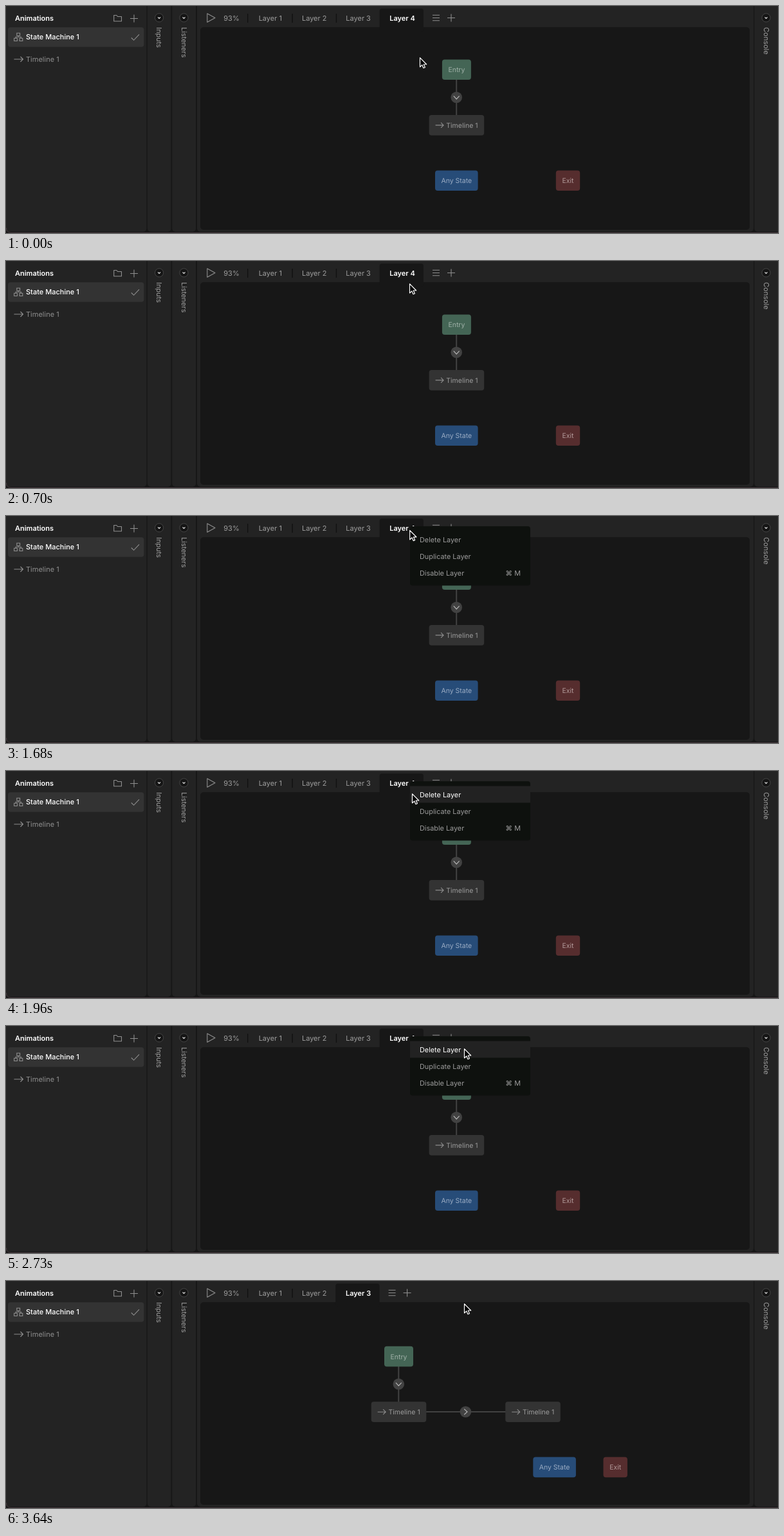
Animation, 1200 px wide and 354 px high, one loop 4.76 s. Source, as an HTML page:

```html
<!DOCTYPE html>
<html lang="en">
<head>
<meta charset="utf-8">
<title>Deleting a layer</title>
<style>
  html, body { margin: 0; width: 100%; height: 100%; overflow: hidden; background: #161616; }
  svg { display: block; }
  text { font: 11px Inter, sans-serif; fill: #9c9c9c; white-space: pre; text-rendering: geometricPrecision; }
  .strong { font-weight: 600; fill: #fff; }
  .medium { font-weight: 500; fill: #fff; }
  .node { font-size: 10.5px; }
  #menu text { font-size: 10.85px; }
  .icon { fill: none; stroke: #8e8e8e; stroke-width: 1.1; }
  .wire { fill: none; stroke: #424242; stroke-width: 2; }
</style>
</head>
<body>
<svg id="stage" width="1200" height="354" viewBox="0 0 1200 354"></svg>
<script>
const LOOP = 4760, STEP = 70, MENU_OPENS = 1260, LAYER_DELETED = 3640;

const rect = (x, y, w, h, fill, r = 0, attrs = '') =>
  `<rect x="${x}" y="${y}" width="${w}" height="${h}" rx="${r}" fill="${fill}" ${attrs}/>`;
const label = (x, y, text, attrs = '') => `<text x="${x}" y="${y}" ${attrs}>${text}</text>`;
const icon = (d, attrs = '') => `<path class="icon" d="${d}" ${attrs}/>`;
const plus = (x, y) => icon(`M${x - 6} ${y}h12M${x} ${y - 6}v12`);
const arrow = (x, y, w) => icon(`M${x} ${y}h${w}m-4 -4l4 4l-4 4`);

const sidePanel = (x, w, title) => {
  const cx = x + 18.3;
  return rect(x, -6, w, 358, '#232323', 5) +
    `<circle cx="${cx}" cy="18.3" r="6.6" fill="#151515" stroke="#454545"/>` +
    icon(`M${cx - 2} 17.5l2 2l2 -2`, 'style="stroke:#ddd"') +
    label(0, 0, title, `transform="translate(${cx - 4} 33) rotate(90)"`);
};

const node = (x, y, w, text, fill, color) =>
  rect(x, y, w, 31.6, fill, 4) +
  label(x + w / 2, y + 19.7, text, `class="node" text-anchor="middle" style="fill:${color}"`);
const entry = (x, y) => node(x, y, 45, 'Entry', '#446555', '#a0b1a8');
const anyState = (x, y) => node(x, y, 66.6, 'Any State', '#274c78', '#9aabc3');
const exit = (x, y) => node(x, y, 37.4, 'Exit', '#562d2e', '#b39b9b');
const timeline = (x, y) =>
  rect(x, y, 85.6, 31.8, '#333', 4) + arrow(x + 10, y + 16, 12.5) +
  label(x + 26.7, y + 19.7, 'Timeline 1', 'class="node"');
const joint = (x, y, turn) =>
  `<g transform="translate(${x} ${y}) rotate(${turn})"><circle r="8.8" fill="#424242"/>` +
  icon('M-4.4 -2.2L0 2.6L4.4 -2.2', 'style="stroke:#bbb"') + '</g>';
const start = (x, y) =>
  `<path class="wire" d="M${x} ${y + 30}v58"/>` + joint(x, y + 59, 0) +
  entry(x - 22.3, y) + timeline(x - 42.6, y + 86.4);

// Tab bar with the last layer selected
const tabs = count => {
  const tabX = n => 376 + 68.4 * (n - 1);
  const end = tabX(count + 1) - .6;
  let out = rect(end - 68.4, 4, 68.4, 36, '#171717', 4);
  for (let n = 1; n <= count; n++) {
    if (n < count) out += rect(n === 1 ? 375 : tabX(n), 12, 1.4, 14, '#111');
    out += label(tabX(n) + 34.8, 22.5, `Layer ${n}`,
      `text-anchor="middle" class="${n === count ? 'strong' : ''}"`);
  }
  return out + icon(`M${end + 14} 14.3h11m-11 4.2h11m-11 4.2h11`) + plus(end + 43, 18.5);
};

const fourLayers = tabs(4) + start(700.2, 83.5) + anyState(667, 256.4) + exit(854.8, 256.4);
const threeLayers = tabs(3) + '<path class="wire" d="M652 204h126"/>' + joint(714.4, 204, -90) +
  start(610.3, 101.8) + timeline(776.2, 188.2) + anyState(819.3, 274.6) + exit(928.5, 274.6);

const menu =
  rect(628, 16, 187, 92.5, '#0e110e', 4) +
  rect(628, 23.5, 187, 26, '#222', 0, 'id="hover"') +
  label(643, 40.8, 'Delete Layer', 'id="delete"') +
  label(643, 66.8, 'Duplicate Layer') +
  label(643, 92.8, 'Disable Layer') +
  label(800, 92.8, '⌘ M', 'text-anchor="end"');

document.getElementById('stage').innerHTML =
  rect(-1, -6, 219.5, 358, '#232323', 5) +
  '<path d="M.5 346q0 7.5 7.5 7.5H1200" fill="none" stroke="#45383e"/>' +
  label(14, 23.3, 'Animations', 'class="strong"') +
  icon('M167.7 23.5v-9h4.2l1.6 2h6v7.2h-11.8z', 'stroke-linejoin="round"') + plus(199, 19.5) +
  rect(3, 33.3, 211.4, 30.4, '#333', 4) +
  icon('M16.8 42.2h4.8v4h-4.8zM12.7 50.3h4.8v4.2h-4.8zM21 50.3h4.8v4.2h-4.8zM19.2 46.2v2M15.1 50.3v-2h8.3v2') +
  label(31, 52.3, 'State Machine 1', 'class="medium"') +
  icon('M194.8 49.5l3.8 3.8l8.4 -9') +
  arrow(12.5, 83, 14) + label(31, 87, 'Timeline 1', 'style="fill:#8e8e8e"') +
  sidePanel(219.8, 36.8, 'Inputs') +
  sidePanel(258.2, 37, 'Listeners') +
  rect(297, -6, 865, 358, '#232323', 5) +
  rect(302, 33, 854, 316, '#171717', 5) +
  icon('M312.8 11.8v13.4l12.2 -6.7z', 'stroke-linejoin="round"') +
  label(338.3, 22.5, '93%') +
  sidePanel(1163.2, 42, 'Console') +
  `<g id="before">${fourLayers}</g><g id="after">${threeLayers}</g><g id="menu">${menu}</g>` +
  '<path id="cursor" d="M.5 .7V15L3.8 11.9L6 16.8L8.4 15.8L6.2 11H10.7Z" fill="#000" stroke="#fff" stroke-width="1.2" stroke-linejoin="round"/>';

// Pointer path: time, x, y
const path = [
  [0, 643, 80], [140, 643, 80], [700, 627, 35], [1050, 627, 20.5], [1610, 627, 20.5],
  [1960, 631, 35], [2080, 639, 36.5], [2170, 648, 35.5], [2380, 679, 32],
  [2450, 689, 31.5], [2730, 712, 35], [LOOP, 712, 35]
];

const slope = (i, k) => (path[i + 1][k] - path[i][k]) / (path[i + 1][0] - path[i][0]);

// Tangent that never overshoots and vanishes at rests and turning points
function tangent(i, k) {
  if (i === 0 || i === path.length - 1) return 0;
  const a = slope(i - 1, k), b = slope(i, k);
  return a * b > 0 ? 2 * a * b / (a + b) : 0;
}

function pointer(t, k) {
  const i = path.findIndex((p, n) => n < path.length - 1 && t < path[n + 1][0]);
  const [p, q] = [path[i], path[i + 1]];
  const span = q[0] - p[0], u = (t - p[0]) / span, v = 1 - u;
  return p[k] * v * v * (1 + 2 * u) + q[k] * u * u * (1 + 2 * v) +
    span * u * v * (tangent(i, k) * v - tangent(i + 1, k) * u);
}

const part = Object.fromEntries(['before', 'after', 'menu', 'hover', 'delete', 'cursor']
  .map(id => [id, document.getElementById(id)]));
const show = (el, on) => { el.style.display = on ? '' : 'none'; };

function draw() {
  const t = Math.floor(performance.now() % LOOP / STEP) * STEP;
  const x = pointer(t, 1), y = pointer(t, 2);
  const deleted = t >= LAYER_DELETED;
  const hovering = t >= MENU_OPENS && y > 23.5;
  show(part.before, !deleted);
  show(part.after, deleted);
  show(part.menu, t >= MENU_OPENS && !deleted);
  show(part.hover, hovering);
  part.delete.style.fill = hovering ? '#fff' : '';
  part.cursor.setAttribute('transform', `translate(${x} ${y})`);
  requestAnimationFrame(draw);
}
draw();
</script>
</body>
</html>
```
